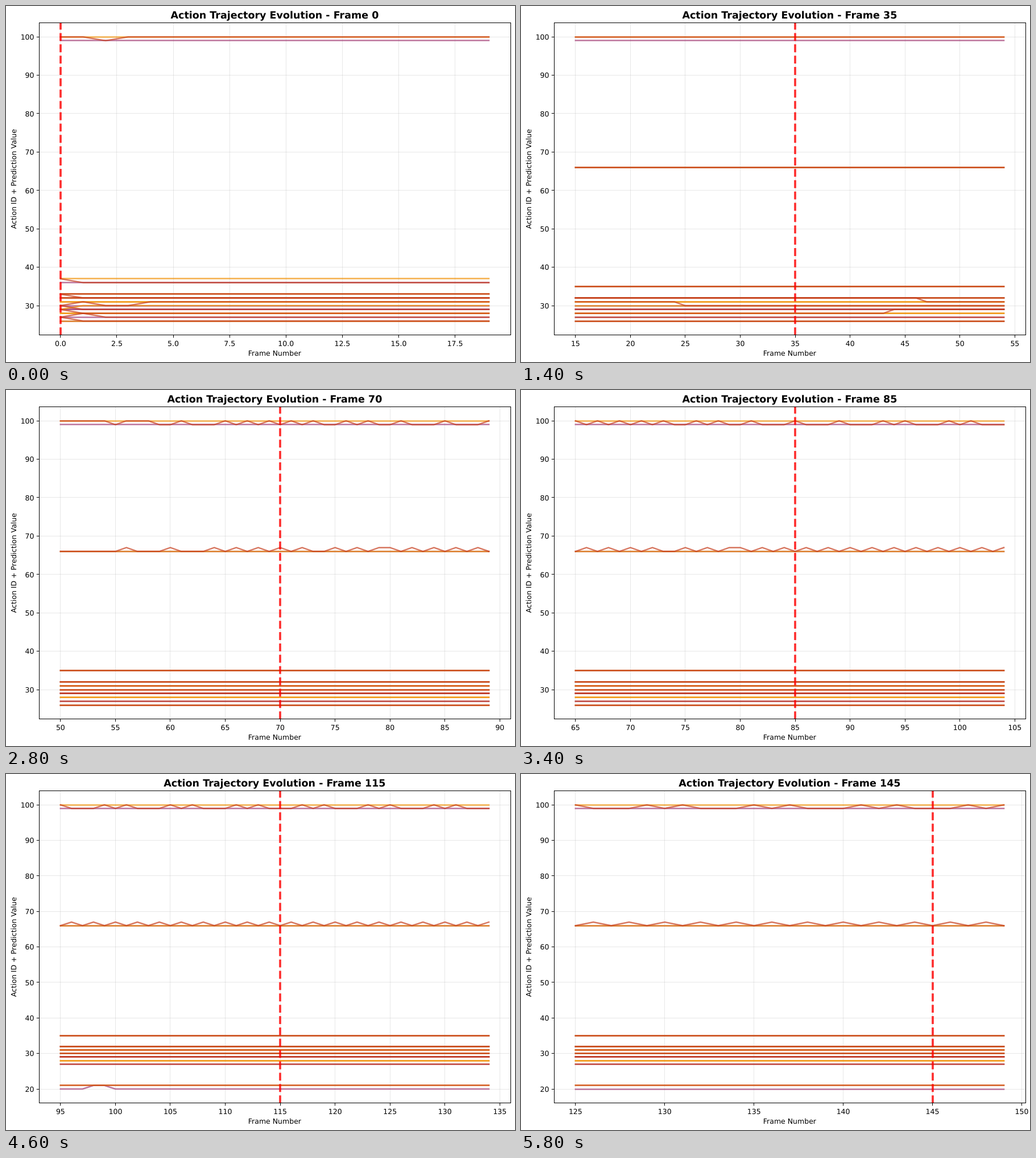
Write an HTML page that moves like this. It is 895 px wide and 625 px high and loops after 6 s.

```html
<!DOCTYPE html>
<html lang="en">
<head>
<meta charset="utf-8">
<title>Action Trajectory Evolution</title>
<style>
  html, body { margin: 0; width: 100%; height: 100%; overflow: hidden; background: #fff; }
  svg { display: block; width: 895px; height: 625px; }
  text { font: 12.5px "DejaVu Sans", sans-serif; text-rendering: geometricPrecision; }
  .title { font-size: 17.5px; font-weight: bold; }
  .mid { text-anchor: middle; }
  .end { text-anchor: end; }
  .grid { stroke: #b0b0b0; stroke-opacity: .3; }
  .tick { stroke: #000; }
  .series { fill: none; stroke-width: 2.5; stroke-opacity: .7; stroke-linecap: square; stroke-linejoin: round; }
  .cursor { stroke: #f00; stroke-opacity: .8; stroke-width: 3.75; stroke-dasharray: 13.875 6; }
</style>
</head>
<body>
<svg viewBox="0 0 895 625">
  <g id="plot"></g>
  <rect x="58.5" y="29.5" width="829" height="548" fill="none" stroke="#000"/>
  <text id="title" class="title mid" x="472.4" y="22"></text>
  <text class="mid" x="472.4" y="614.3">Frame Number</text>
  <text class="mid" transform="translate(18.4 303.7) rotate(-90)">Action ID + Prediction Value</text>
</svg>
<script>
const LEFT = 58.2, RIGHT = 886.7, TOP = 29.2, BOTTOM = 578;
const STEP_MS = 200, STEP = 5, STEPS = 30, TOTAL = 150, SPAN = 20;
const COLORS = ['#A23B72', '#F18F01', '#C73E1D'];

const off = () => 0, on = () => 1;
const atStart = n => n < 1;
const oneOf = (...list) => n => list.includes(n);
const early99 = oneOf(56, 57, 58, 61, 65, 67, 69, 71, 73, 76, 78, 81, 85, 89);
const early66 = oneOf(56, 60, 64, 66, 68, 70, 72, 75, 77, 79);

// Action id -> binary prediction over time for each of the three models.
const predictions = {
  20: [oneOf(90, 94, 98, 99), on, on],
  26: [off, off, atStart],
  27: [off, on, n => n === 1],
  28: [on, off, n => n < 1 || n > 43],
  29: [off, n => n > 0, atStart],
  30: [off, on, n => n === 1 || (n > 3 && n < 25)],
  31: [on, off, n => n < 47],
  32: [off, off, atStart],
  33: [off, off, off],
  35: [off, off, off],
  36: [off, on, atStart],
  66: [off, off, n => n < 80 ? early66(n) : n % 2 === 0],
  99: [off, on, n => n < 55 ? n !== 2 : n < 93 ? early99(n) : n % 6 === 3 || n % 6 === 5]
};

function selectedActions(frame) {
  const swapped = frame >= 30;
  return [frame >= 95 ? 20 : 26, 27, 28, 29, 30, 31, 32,
          swapped ? 35 : 33, swapped ? 66 : 36, 99];
}

const crisp = v => Math.floor(v) + .5;
const line = (cls, x1, y1, x2, y2) =>
  `<line class="${cls}" x1="${x1}" y1="${y1}" x2="${x2}" y2="${y2}"/>`;

// Axis limits with a 5% margin on both sides.
function scale(lo, hi, from, to) {
  const pad = (hi - lo) * .05, min = lo - pad, max = hi + pad;
  const map = v => from + (v - min) / (max - min) * (to - from);
  map.ticks = step => {
    const list = [];
    for (let v = Math.ceil(min / step) * step; v <= max; v += step) list.push(v);
    return list;
  };
  return map;
}

function seriesPath(action, model, first, last, x, y) {
  const values = [];
  for (let n = first; n <= last; n++) values.push(action + Number(predictions[action][model](n)));
  const flat = values.every(v => v === values[0]);
  const points = values.map((v, i) => {
    const py = flat ? crisp(y(v)) : y(v);
    return `${x(first + i).toFixed(2)},${py.toFixed(2)}`;
  });
  return `<polyline class="series" stroke="${COLORS[model]}" points="${points.join(' ')}"/>`;
}

function render(frame) {
  const first = Math.max(0, frame - SPAN);
  const last = Math.min(TOTAL, frame + SPAN) - 1;
  const actions = selectedActions(frame);
  const x = scale(first, last, LEFT, RIGHT);
  const y = scale(actions[0], 100, BOTTOM, TOP);
  const xStep = last - first < 20 ? 2.5 : 5;
  let out = '';

  for (const v of x.ticks(xStep)) {
    const px = crisp(x(v));
    out += line('grid', px, TOP, px, BOTTOM) + line('tick', px, BOTTOM, px, BOTTOM + 4.4);
    out += `<text class="mid" x="${x(v)}" y="596.5">${xStep === 2.5 ? v.toFixed(1) : v}</text>`;
  }
  for (const v of y.ticks(10)) {
    const py = crisp(y(v));
    out += line('grid', LEFT, py, RIGHT, py) + line('tick', LEFT - 4.4, py, LEFT, py);
    out += `<text class="end" x="49.5" y="${y(v) + 4.7}">${v}</text>`;
  }
  COLORS.forEach((_, model) => {
    for (const action of actions) out += seriesPath(action, model, first, last, x, y);
  });
  const cx = Math.round(x(frame));
  out += line('cursor', cx, BOTTOM, cx, TOP);

  document.getElementById('plot').innerHTML = out;
  document.getElementById('title').textContent = `Action Trajectory Evolution - Frame ${frame}`;
}

let shown = -1;
const start = performance.now();
function tick(now) {
  const frame = Math.floor(Math.max(0, now - start) / STEP_MS) % STEPS * STEP;
  if (frame !== shown) render(shown = frame);
  requestAnimationFrame(tick);
}
tick(start);
</script>
</body>
</html>
```
